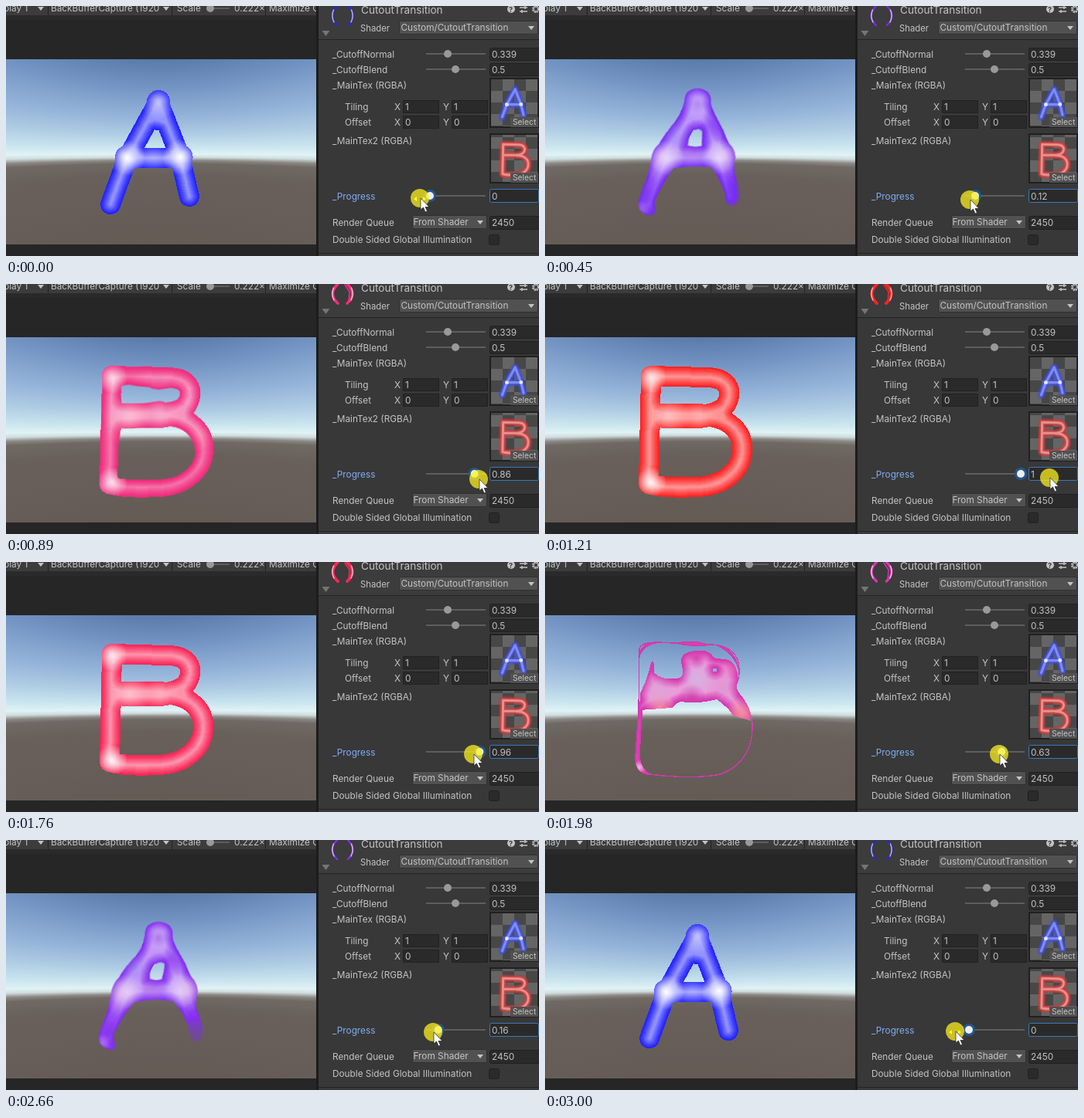
Recreate the animation shown at these times as an HTML page with a canvas. Size 689x324 px, loop 3100 ms.

```html
<!DOCTYPE html>
<html>
<head>
<meta charset="utf-8">
<style>
html, body { margin: 0; width: 100%; height: 100%; overflow: hidden; background: #282828; }
svg, canvas { position: absolute; left: 0; top: 0; display: block; }
#sky { top: 69px; }
#letter { left: 112px; top: 98px; }
text { font: 11.8px Inter, Roboto, sans-serif; fill: #c4c4c4; }
.field { fill: #2a2a2a; stroke: #212121; }
.drop { fill: #515151; stroke: #303030; }
.track { fill: #5e5e5e; }
.knob { fill: #999; }
.small { font-size: 10.3px; }
.line { fill: none; stroke-linecap: round; stroke-linejoin: round; }
</style>
</head>
<body>
<svg width="689" height="324" viewBox="0 0 689 324">
  <defs>
    <pattern id="checks" x="627" y="95" width="30" height="30" patternUnits="userSpaceOnUse">
      <path fill="#474747" d="M0 0h30v30H0z"/>
      <path fill="#656565" d="M15 0h15v15H15zM0 15h15v15H0z"/>
    </pattern>
    <path id="A" d="M135 257L157 197L197 124L225 196L237 247M157 197H225"/>
    <path id="B" d="M137 119L206 121C234 120 240 135 238 146C235 162 222 168 200 170H140M200 172C235 170 256 190 255 214C255 245 225 263 196 263C170 264 150 264 134 259L137 119"/>
    <path id="down" fill="#c4c4c4" d="M-4 -2H4L0 3Z"/>
    <clipPath id="bar"><path d="M0 0H401V12H0z"/></clipPath>
  </defs>

  <rect width="402" height="324" fill="#2a2a2a"/>
  <rect x="-6" y="18" width="407" height="320" rx="4" fill="#262626"/>
  <g clip-path="url(#bar)">
    <rect width="402" height="12" fill="#3c3c3c"/>
    <path stroke="#232323" d="M54.5 0V12M214.5 0V12M335.5 0V12"/>
    <text x="-3" y="7">play 1</text>
    <text x="58" y="7">BackBufferCapture (1920</text>
    <text x="221" y="7">Scale</text>
    <text x="295" y="7">0.222&#215;</text>
    <text x="340" y="7">Maximize On Play</text>
    <use href="#down" x="45" y="3"/><use href="#down" x="207" y="3"/>
    <rect class="track" x="259" y="2" width="30" height="2"/>
    <circle class="knob" cx="264" cy="3" r="5"/>
  </g>

  <rect x="401" width="3" height="324" fill="#1c1c1c"/>
  <rect x="404" width="285" height="324" fill="#383838"/>
  <rect x="404" width="285" height="43" fill="#3c3c3c"/>
  <path stroke="#232323" d="M404 43.5H689M404 320.5H689"/>
  <path fill="#757575" d="M408.500 32H418.500L413.500 39Z"/>
  <text x="459" y="10" style="font-size:13.6px">CutoutTransition</text>
  <circle cx="653" cy="4" r="5" fill="#c4c4c4"/>
  <text x="650" y="8" style="font-size:9px;font-weight:700;fill:#383838">?</text>
  <path stroke="#c4c4c4" stroke-width="1.500" d="M664 2H674M664 7H674M671 0V4M667 5V9"/>
  <circle cx="685" cy="4" r="3.500" fill="none" stroke="#c4c4c4" stroke-width="3" stroke-dasharray="2 .75"/>
  <g id="ball" class="line"></g>

  <text x="458" y="33" style="font-size:11.3px">Shader</text>
  <rect class="drop" x="508.500" y="19.500" width="179" height="17" rx="2"/>
  <text x="510.500" y="32">Custom/CutoutTransition</text>
  <use href="#down" x="679" y="28"/>

  <text x="422" y="67">_CutoffNormal</text>
  <text x="422" y="87">_CutoffBlend</text>
  <text x="422" y="107">_MainTex (RGBA)</text>
  <text x="438" y="135">Tiling</text>
  <text x="438" y="155">Offset</text>
  <text x="422" y="179">_MainTex2 (RGBA)</text>
  <text x="422" y="251" style="fill:#7fadf5">_Progress</text>
  <text x="422" y="285">Render Queue</text>
  <text x="422" y="307">Double Sided Global Illumination</text>

  <rect class="track" x="543" y="61" width="77" height="2"/>
  <circle class="knob" cx="571" cy="62" r="5"/>
  <rect class="track" x="543" y="81" width="77" height="2"/>
  <circle class="knob" cx="581" cy="82" r="5"/>
  <rect class="field" x="625.500" y="54.500" width="66" height="16" rx="2"/>
  <rect class="field" x="625.500" y="74.500" width="66" height="16" rx="2"/>
  <text x="628" y="67">0.339</text>
  <text x="628" y="87">0.5</text>

  <path class="field" d="M513.500 122.500h46v16h-46zM576.500 122.500h46v16h-46zM513.500 142.500h46v16h-46zM576.500 142.500h46v16h-46z"/>
  <text x="502" y="135">X</text><text x="516" y="135">1</text>
  <text x="565" y="135">Y</text><text x="579" y="135">1</text>
  <text x="502" y="155">X</text><text x="516" y="155">0</text>
  <text x="565" y="155">Y</text><text x="579" y="155">0</text>

  <rect x="626" y="94" width="62" height="63" fill="url(#checks)" stroke="#202020" stroke-width="2"/>
  <g class="line" transform="translate(605 74.500) scale(.27)">
    <use href="#A" stroke="#3a48d0" stroke-opacity=".4" stroke-width="38"/>
    <use href="#A" stroke="#4354ea" stroke-opacity=".75" stroke-width="26"/>
    <use href="#A" stroke="#8c9af6" stroke-opacity=".8" stroke-width="12"/>
    <path d="M157 197h.1M225 196h.1" stroke="#e4e8ff" stroke-width="18"/>
  </g>
  <rect x="626" y="166" width="62" height="63" fill="url(#checks)" stroke="#202020" stroke-width="2"/>
  <g class="line" transform="translate(605 146.500) scale(.275)">
    <use href="#B" stroke="#c03434" stroke-opacity=".4" stroke-width="38"/>
    <use href="#B" stroke="#d84444" stroke-opacity=".75" stroke-width="26"/>
    <use href="#B" stroke="#f09c98" stroke-opacity=".85" stroke-width="11"/>
  </g>
  <path fill="#515151" d="M652 144h36v13h-36zM652 216h36v13h-36z"/>
  <text class="small" x="655" y="154">Select</text>
  <text class="small" x="655" y="226">Select</text>

  <rect class="track" x="543" y="245" width="77" height="2"/>
  <rect class="field" x="625.500" y="237.500" width="63" height="17" rx="2" style="stroke:#3a79bb"/>
  <text id="value" x="628" y="251"></text>
  <g id="handle"><circle r="8" fill="#23588c"/><circle r="5" fill="#eee"/></g>

  <rect class="drop" x="525.500" y="271.500" width="96" height="17" rx="2"/>
  <text x="526.500" y="284">From Shader</text>
  <use href="#down" x="613" y="280"/>
  <rect class="field" x="625.500" y="272.500" width="66" height="17" rx="2"/>
  <text x="628" y="285">2450</text>
  <rect class="field" x="624.500" y="296.500" width="13" height="13" rx="2"/>

  <g id="cursor">
    <circle r="12" fill="#fff01c" fill-opacity=".74"/>
    <path id="drag" fill="#ff2" d="M-8 1l4 -3v6zM8 1l-4 -3v6z"/>
    <path fill="#fff" stroke="#222" stroke-width=".7" d="M1 0V15L4.500 12L7 18L9.500 17L7 11.500H12Z"/>
  </g>
</svg>
<canvas id="sky" width="401" height="240"></canvas>
<canvas id="letter" width="164" height="188"></canvas>

<script>
const $ = id => document.getElementById(id);
const W = 164, H = 188, LEFT = 112, TOP = 98, LOOP = 3100;
const outline = id => $(id).getAttribute('d');

// Sky in perspective: lines of equal elevation bend away from the horizon
function drawSky() {
  const g = $('sky').getContext('2d');
  const shades = g.createLinearGradient(0, -120, 0, 120);
  const stops = [[-120, '#5a7ba9'], [-80, '#7697c5'], [-45, '#94b4d9'], [-22, '#b0cde4'], [-5, '#cbe6ef'],
    [3, '#e0f3f5'], [7, '#cfdcdd'], [11, '#8b8884'], [15, '#6f6964'], [30, '#69605b'], [120, '#645b55']];
  for (const [y, color] of stops) shades.addColorStop((y + 120) / 240, color);
  g.fillStyle = shades;
  for (let x = 0; x < 401; x++) {
    g.setTransform(1, 0, 0, Math.hypot(1, (x - 200) / 208), x, 120);
    g.fillRect(0, -120, 1, 240);
  }
}
drawSky();

// Torn pixels where the blended surface just meets the cutoff
let seed = 7;
const rnd = () => (seed = seed * 16807 % 2147483647) / 2147483647;
let specks = '';
for (let i = 0; i < 22; i++) {
  const y = 158 + 21 * rnd(), x = 190 + (y - 158) * .9 + 9 * rnd();
  specks += `M${x | 0} ${y | 0}h2v2h-2z`;
}

// Key shapes: fill path, strokes [path, width], spots [x, y, radius, rgb, alpha]
const poses = [
  { p: 0, fill: '', strokes: [[outline('A'), 26], ['M157 197h.1M225 196h.1', 33], ['M197 124h.1', 30], ['M195 152h.1', 18]],
    spots: [[157, 197, 23, '255,255,255', 1], [225, 196, 23, '255,255,255', 1], [197, 126, 22, '235,235,255', .5], [191, 196, 22, '225,225,255', .35]] },
  { p: .32, ease: 1, strokes: [],
    fill: 'M198 103C209 103 219 108 219 118V125C217 138 236 148 241 165C247 176 254 185 254 196C254 205 247 213 249 220C258 232 260 245 257 254C252 264 243 270 236 268C233 265 247 260 250 250C250 238 242 224 232 217C220 207 207 204 194 204C178 205 163 210 155 217C143 227 132 240 129 250C127 260 134 267 143 269C146 272 140 274 133 273C122 271 117 262 118 252C120 236 130 226 129 214C127 200 135 188 143 172C150 160 166 152 172 146C179 139 176 128 177 115C178 107 187 103 198 103Z'
      + 'M187 172C188 165 190 163 196 158C200 152 210 150 212 157C214 165 206 171 202 176C196 180 188 180 187 172Z',
    spots: [[146, 200, 26, '240,200,225', .85], [239, 195, 26, '240,200,225', .85], [165, 166, 23, '140,130,240', .75], [193, 146, 18, '195,145,240', .6], [197, 112, 12, '195,125,245', .4], [197, 127, 12, '135,60,220', .9], [190, 188, 20, '165,60,210', .6], [124, 263, 11, '235,200,245', .7]] },
  { p: .43, ease: 1, strokes: [],
    fill: 'M177 111C186 102 210 102 221 110C224 115 217 114 210 112C200 109 190 109 184 112Z'
      + 'M197 114C208 114 215 117 215 124C216 134 222 139 230 137C237 133 244 143 243 150C241 158 242 165 250 178C258 190 261 200 260 211C256 218 246 222 239 217C233 205 222 197 209 193C195 189 180 191 168 196C155 204 148 210 146 215L134 219C127 228 122 242 122 252C122 264 130 269 144 272C140 276 128 276 121 270C115 260 117 245 121 230C125 215 123 205 125 192C128 180 133 175 134 165C136 156 145 158 155 154C168 150 178 143 178 133C178 121 184 114 197 114Z'
      + 'M260 244C262 256 251 270 236 271C244 266 252 258 254 250Z' + specks,
    spots: [[138, 201, 25, '240,165,200', .9], [248, 197, 25, '240,165,200', .9], [160, 164, 23, '205,140,230', .7], [195, 149, 23, '205,155,235', .7], [225, 160, 18, '215,130,235', .6], [197, 127, 13, '175,85,230', .9], [175, 180, 20, '180,55,200', .9], [219, 180, 18, '180,55,200', .9], [124, 265, 9, '250,210,250', .8]] },
  { p: .63, ease: 1,
    strokes: [['M122 112C124 106 135 104 145 104L215 107C238 108 251 120 251 138C252 150 248 158 245 165C262 180 269 200 268 217C267 250 245 274 215 277C185 280 155 278 135 275C120 272 116 265 117 250L121 190Z', 1.3]],
    fill: 'M121 192L117 250C116 268 124 277 140 276C132 273 127 268 124 260C122 245 125 215 126 192ZM122 124C122 108 130 103 152 104C136 106 127 110 122 124ZM168 105C185 101 205 103 212 108C200 110 180 109 168 105ZM220 107C240 110 252 126 251 146C249 130 240 117 220 107Z'
      + 'M197 115C208 114 215 117 217 123C223 127 231 124 239 128C248 134 252 148 247 160C250 172 259 180 264 192L266 206L243 199C238 190 230 184 222 178C205 182 190 184 178 181C170 180 168 188 163 189L122 192L123 170C128 160 134 146 137 131C140 124 142 135 141 143C148 152 165 153 174 150C182 145 176 135 176 127C177 119 185 115 197 115Z'
      + 'M217 138h5v4h-5z',
    spots: [[149, 189, 20, '248,145,160', .9], [254, 197, 22, '248,145,150', .9], [145, 165, 24, '220,165,215', .8], [197, 151, 25, '212,180,228', .9], [231, 162, 22, '220,150,210', .7], [240, 140, 14, '235,110,185', .6], [196, 125, 14, '208,65,175', .9], [190, 176, 18, '205,60,170', .8], [122, 266, 9, '255,210,240', .8]] },
  { p: 1, ease: 2, fill: '', strokes: [[outline('B'), 26], ['M150 171H204', 31]],
    spots: [[137, 257, 20, '255,255,255', .9], [137, 122, 20, '255,255,255', .8], [160, 171, 28, '255,235,235', .5], [200, 171, 24, '255,225,225', .35]] }
];

function layer(paint) {
  const c = document.createElement('canvas');
  c.width = W; c.height = H;
  const g = c.getContext('2d');
  g.translate(-LEFT, -TOP);
  g.lineCap = g.lineJoin = 'round';
  paint(g);
  return g.getImageData(0, 0, W, H).data;
}

// Two-pass distance to the nearest pixel on the other side
function distance(inside, side) {
  const d = Float32Array.from(inside, v => v === side ? 1e3 : 0);
  const pass = (i, s) => {
    d[i] = Math.min(d[i], d[i - s] + 1, d[i - s * W] + 1, d[i - s * (W + 1)] + 1.414, d[i - s * (W - 1)] + 1.414);
  };
  for (let i = W + 1; i < W * H - W - 1; i++) pass(i, 1);
  for (let i = W * H - W - 2; i > W; i--) pass(i, -1);
  return d;
}

for (const pose of poses) {
  const mask = layer(g => {
    g.fill(new Path2D(pose.fill), 'evenodd');
    for (const [d, w] of pose.strokes) { g.lineWidth = w; g.stroke(new Path2D(d)); }
  });
  const inside = Array.from({ length: W * H }, (_, i) => mask[i * 4 + 3] > 127);
  const inner = distance(inside, true), outer = distance(inside, false);
  pose.field = inner.map((v, i) => v - outer[i]);
  pose.tint = layer(g => {
    for (const [x, y, r, rgb, a] of pose.spots) {
      const glow = g.createRadialGradient(x, y, 0, x, y, r);
      glow.addColorStop(0, `rgba(${rgb},${a})`);
      glow.addColorStop(.5, `rgba(${rgb},${a * .5})`);
      glow.addColorStop(1, `rgba(${rgb},0)`);
      g.fillStyle = glow;
      g.fillRect(x - r, y - r, 2 * r, 2 * r);
    }
  });
}

const ctx = $('letter').getContext('2d');
const image = ctx.createImageData(W, H);
// Blue to red, blended in linear light
const baseColor = p => [35 + 220 * p ** .45, 35 + 80 * p * (1 - p), 35 + 220 * (1 - p) ** .45];

function drawLetter(p) {
  const n = Math.max(1, poses.findIndex(s => s.p >= p));
  const a = poses[n - 1], b = poses[n];
  const k = 1 - (1 - (p - a.p) / (b.p - a.p)) ** b.ease;
  const base = baseColor(p), out = image.data;
  for (let i = 0; i < W * H; i++) {
    const d = a.field[i] * (1 - k) + b.field[i] * k, j = i * 4;
    out[j + 3] = 255 * Math.max(0, Math.min(1, d / 2 + .5));
    if (!out[j + 3]) continue;
    const white = .5 * Math.min(1, Math.max(0, d - 1) / 12) ** 1.2;
    const ta = a.tint[j + 3] / 255 * (1 - k), tb = b.tint[j + 3] / 255 * k;
    for (let c = 0; c < 3; c++) {
      let v = base[c] + (255 - base[c]) * white;
      v += (a.tint[j + c] - v) * ta;
      out[j + c] = v + (b.tint[j + c] - v) * tb;
    }
  }
  ctx.putImageData(image, 0, 0);
}

function drawBall(p) {
  const color = `rgb(${baseColor(p).map(Math.round)})`;
  const side = `M${428 + p} 0Q${415 + p} 13 ${428 + p} 25M${442 - p} 0Q${455 - p} 13 ${442 - p} 25`;
  const fold = p > .5 ? `<path d="M438 1L444 10L443 24" stroke="${color}" stroke-width="1.5"/>` : '';
  $('ball').innerHTML = `${fold}<path d="${side}" stroke="${color}" stroke-width="${2 + 2 * p}"/>
    <path d="M423.500 5Q420 13 424 21M446.500 5Q450 13 446 21" stroke="#fff" stroke-opacity=".65" stroke-width="1.5"/>`;
}

const steps = [
  [0, 0, 535, 249], [330, .03, 541, 250], [450, .12, 549, 251], [570, .27, 562, 253], [670, .43, 575, 254],
  [790, .65, 592, 254], [890, .86, 611, 253], [990, 1, 639, 252], [1210, 1, 652, 251],
  [1540, 1, 634, 250], [1650, .99, 615, 249], [1760, .96, 604, 249], [1880, .81, 597, 249], [1980, .63, 587, 249],
  [2100, .54, 580, 249], [2220, .46, 575, 250], [2330, .39, 570, 250], [2440, .32, 565, 250], [2540, .24, 559, 250],
  [2660, .16, 552, 249], [2780, .08, 545, 249], [2890, .02, 537, 248], [3000, 0, 530, 248]
];

let shown;
function frame() {
  const t = performance.now() % LOOP;
  const step = steps.findLast(s => s[0] <= t);
  if (step !== shown) {
    shown = step;
    const [, p, x, y] = step;
    drawLetter(p);
    drawBall(p);
    $('value').textContent = p;
    $('handle').setAttribute('transform', `translate(${548 + 67 * p} 246)`);
    $('cursor').setAttribute('transform', `translate(${x} ${y})`);
    $('drag').style.display = p ? 'none' : '';
  }
  requestAnimationFrame(frame);
}
frame();
</script>
</body>
</html>
```
